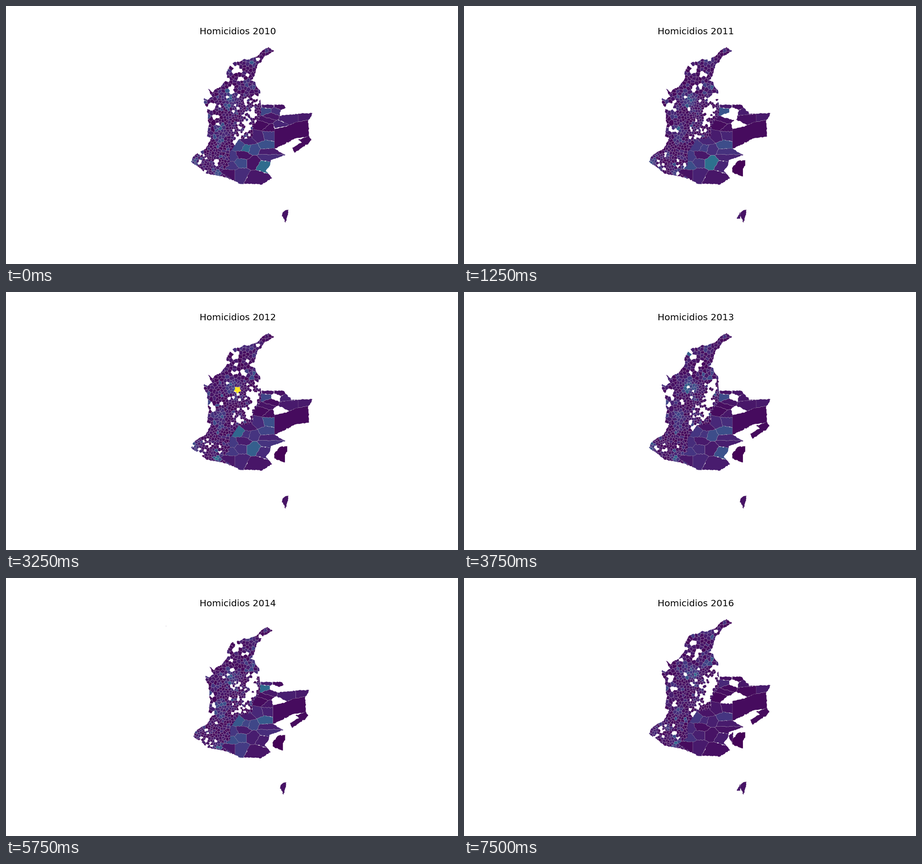
Animation, 990 px wide and 566 px high, one loop 8 s. Source, as a matplotlib script:

```python
import matplotlib.pyplot as plt
import numpy as np
from matplotlib.animation import ArtistAnimation
from matplotlib.collections import PolyCollection
from matplotlib.path import Path
from matplotlib.transforms import Affine2D

W, H, DPI = 990, 566, 64
PX = 72 / DPI
YEARS = range(10, 17)
VIRIDIS = plt.get_cmap("viridis")

WEST = [575, 90, 587, 99, 575, 107, 567, 109, 560, 122, 553, 126, 543, 155,
        537, 164, 545, 166, 551, 180, 556, 184, 558, 214, 562, 240, 562, 290,
        515, 330, 505, 386, 475, 374, 440, 368, 428, 358, 405, 341, 414, 326,
        430, 317, 437, 314, 450, 290, 440, 286, 444, 262, 440, 222, 433, 211,
        434, 202, 442, 206, 452, 199, 441, 179, 453, 190, 458, 183, 470, 178,
        484, 158, 483, 146, 492, 128, 500, 123, 510, 123, 520, 117, 528, 118,
        550, 111, 563, 97]

EAST = [560, 217, 608, 217, 626, 237, 640, 236, 640, 254, 612, 264, 588, 268,
        588, 313, 612, 327, 580, 338, 578, 350, 569, 362, 583, 377, 562, 391,
        512, 390, 470, 364, 490, 350, 490, 322, 510, 292, 540, 290, 543, 262,
        558, 240]

# Large eastern areas: centre and usual level in percent.
SEEDS = [574, 219, 8, 600, 221, 5, 571, 230, 30, 591, 230, 12, 612, 232, 9,
         580, 241, 6, 615, 246, 7, 573, 251, 5, 565, 261, 4, 577, 267, 5,
         598, 263, 17, 552, 287, 12, 577, 284, 13, 531, 297, 9, 570, 306, 26,
         541, 313, 19, 527, 311, 21, 572, 320, 13, 512, 307, 22, 518, 328, 6,
         542, 343, 8, 572, 332, 12, 566, 349, 10, 513, 343, 19, 496, 332, 18,
         493, 350, 24, 512, 368, 14, 490, 368, 6, 547, 376, 8]

gaps, peaks, lands = [], [], []


def gap(x, y, rx, ry, *years):
    gaps.append((x, y, rx, ry, years))


def peak(x, y, r, top, *years):
    peaks.append((x, y, r, top, years))


def land(level, years, *xy):
    lands.append((level, years, rough(pairs(xy), .6)))


def pairs(xy):
    return np.reshape(xy, (-1, 2)).astype(float)


def rough(poly, amp):
    """Make edges ragged, alike for both neighbours of an edge."""
    out = []
    for a, b in zip(poly, np.roll(poly, -1, axis=0)):
        out.append(a)
        d = b - a
        n = int(np.hypot(*d) // 2.5)
        if n < 2 or d[0] == 0:
            continue
        ends = sorted([tuple(a.round().astype(int)), tuple(b.round().astype(int))])
        rng = np.random.default_rng([abs(int(v)) for v in ends[0] + ends[1]])
        off = rng.normal(0, amp, n - 1)
        normal = np.array([-d[1], d[0]]) / np.hypot(*d)
        if tuple(d) < (0, 0):
            off, normal = off[::-1], -normal
        t = np.arange(1, n) / n
        out.extend(a + t[:, None] * d + off[:, None] * normal)
    return np.array(out)


def spacing(x, y):
    if x > 495 and y > 295:
        return 8
    if 495 < x and 195 < y < 292 or x < 455 and y > 325:
        return 3.8
    if x < 462 and 185 < y < 300:
        return 6.5
    return 5.8 if y < 195 else 4.6


def scatter_sites(rng, outline):
    darts = rng.uniform((403, 90), (590, 393), (11000, 2))
    sites = np.empty((0, 2))
    for p in darts[outline.contains_points(darts)]:
        if not len(sites) or np.hypot(*(sites - p).T).min() > spacing(*p):
            sites = np.vstack([sites, p])
    return sites


def cut(poly, a, b):
    """Keep the part of poly that is nearer to a than to b."""
    n = b - a
    side = poly @ n - n @ (a + b) / 2
    out = []
    for i in range(len(poly)):
        j = (i + 1) % len(poly)
        if side[i] <= 0:
            out.append(poly[i])
        if side[i] * side[j] < 0:
            t = side[i] / (side[i] - side[j])
            out.append(poly[i] + t * (poly[j] - poly[i]))
    return np.array(out)


def voronoi(sites, reach, amp, flat=1):
    """Ragged cells around the sites; flat > 1 makes them wide and low."""
    scale = np.array([1, flat])
    pts = sites * scale
    box = reach * np.array([(-1, -1), (1, -1), (1, 1), (-1, 1)])
    cells = []
    for p in pts:
        cell = p + box
        for q in pts[np.argsort(np.hypot(*(pts - p).T))[1:24]]:
            cell = cut(cell, p, q)
        cells.append(rough(cell / scale, amp))
    return cells


def bell(pts, x, y, r):
    return np.exp(-((pts[:, 0] - x) ** 2 + (pts[:, 1] - y) ** 2) / r ** 2)


def gap_chance(pts):
    """Share of small areas without data, apart from the clusters."""
    x, y = pts.T
    belt = (x - 550 + .42 * (y - 195)) / 15
    p = np.where((y > 190) & (y < 292), .5 * np.exp(-belt ** 2), 0)
    p = np.maximum(p, .28 * bell(pts, 500, 142, 18))
    p = np.maximum(p, .25 * bell(pts, 433, 345, 18))
    return np.maximum(p, .1 * bell(pts, 505, 230, 40)) + .02


def has_data(pts, year, rng, edge):
    known = np.ones(len(pts), bool)
    for x, y, rx, ry, years in gaps:
        if year in years:
            dist = np.hypot((pts[:, 0] - x) / rx, (pts[:, 1] - y) / ry)
            known &= dist > rng.uniform(edge, 1.05, len(pts))
    return known


def raised(pts, year, rng):
    total = np.zeros(len(pts))
    for x, y, r, top, years in peaks:
        if year in years:
            total += top * bell(pts, x, y, r) * rng.uniform(.35, 1.1, len(pts))
    return total


# Clusters without data
gap(500, 142, 9, 8, *YEARS)
gap(515, 161, 9, 4, 10, 13, 15, 16)
gap(517, 177, 9, 5, 11, 12)
gap(497, 172, 3, 8, 10, 12, 15)
gap(452, 222, 9, 9, 10, 11, 13, 15, 16)
gap(450, 251, 6, 9, 12, 13, 14)
gap(460, 243, 9, 6, 10, 15, 16)
gap(454, 281, 10, 4, 10, 11, 15)
gap(546, 202, 6, 10, 10, 11, 13, 14)
gap(536, 227, 11, 10, *range(11, 16))
gap(548, 230, 7, 11, 12, 14, 15, 16)
gap(537, 247, 11, 9, 13, 14, 15, 16)
gap(530, 268, 10, 8, 10, 12, 13, 16)
gap(502, 297, 7, 7, 10, 13, 15, 16)
gap(461, 343, 7, 6, 10, 16)
gap(483, 350, 5, 7, 11, 15)
gap(459, 274, 8, 6, 11, 16)
gap(591, 230, 3, 3, 11, 12, 13, 14, 16)
gap(612, 232, 3, 3, 10, 14)
gap(598, 263, 3, 3, *range(11, 17))
gap(580, 241, 3, 3, 11, 15)
gap(577, 267, 3, 3, 16)

# Raised levels
peak(492, 204, 16, .2, *YEARS)
peak(488, 210, 6, .3, 13, 15)
peak(507, 211, 6, .28, 13, 15, 16)
peak(488, 190, 6, .3, 10)
peak(469, 268, 9, .26, *range(10, 16))
peak(469, 294, 9, .2, *YEARS)
peak(464, 365, 9, .25, *YEARS)
peak(413, 341, 9, .2, *range(10, 14))
peak(445, 327, 6, .25, 11, 16)
peak(439, 337, 5, .45, 15)
peak(541, 176, 8, .17, *YEARS)
peak(535, 121, 9, .14, *YEARS)
peak(461, 239, 7, .18, 11, 13, 16)
peak(542, 343, 5, .25, 11, 12)
peak(566, 349, 5, .28, 10, 13)
peak(512, 307, 5, .2, 12)
peak(527, 311, 5, .2, 10)
peak(577, 284, 5, .18, 12)

# Areas with their own shape
land(7, YEARS, 640, 236, 671, 235, 668, 243, 662, 251, 640, 254)
land(3, YEARS, 588, 270, 607, 266, 640, 254, 662, 251, 664, 286, 632, 291,
     611, 303, 588, 313)
land(3, (10, 13, 14, 15, 16), 664, 285, 669, 294, 663, 301, 632, 322, 627, 311,
     648, 299, 640, 293)
land(4, (16,), 579, 346, 589, 338, 590, 353, 587, 363)
land(1, range(11, 17), 587, 356, 600, 340, 616, 338, 616, 350, 611, 357,
     611, 374, 588, 365)
land(5, YEARS, 604, 461, 606, 453, 612, 448, 619, 447, 613, 475)
land(7, (11, 16), 597, 466, 605, 452, 605, 467)
land(11, (15,), 608, 381, 621, 392, 625, 405, 607, 402)
spike = np.linspace(0, 2 * np.pi, 10, endpoint=False)
arm = np.where(np.arange(10) % 2, 5.5, 8.5)
land(100, (12,), *np.c_[507 + arm * np.sin(spike), 214.5 + arm * np.cos(spike)].flat)
for islet_years, ix, iy in ((YEARS, 343, 88), ((14,), 350.5, 70)):
    land(5, islet_years, ix - .4, iy - .5, ix + .4, iy - .5, ix + .4, iy + .5)

fig = plt.figure(figsize=(W / DPI, H / DPI), dpi=DPI, facecolor="white")
ax = fig.add_axes([0, 0, 1, 1])
ax.set(xlim=(0, W), ylim=(H, 0))
ax.axis("off")

rng = np.random.default_rng(11)
west, east = (Path(rough(pairs(xy), .6)) for xy in (WEST, EAST))
towns = scatter_sites(rng, west)
town_cells = voronoi(towns, 16, .45)
town_luck = rng.random(len(towns))
town_level = .015 + .045 * rng.exponential(size=len(towns))
seeds = np.reshape(SEEDS, (-1, 3)).astype(float)
plains, plain_level = seeds[:, :2], seeds[:, 2] / 100
plain_cells = voronoi(plains, 70, .6, 1.5)


def west_level(year):
    n = len(towns)
    luck = np.where(rng.random(n) < .5, town_luck, rng.random(n))
    known = has_data(towns, year, rng, .65) & (luck > gap_chance(towns))
    level = np.where(rng.random(n) < .6, town_level,
                     .015 + .04 * rng.exponential(size=n))
    return known, (level + raised(towns, year, rng)).clip(0, .55)


def east_level(year):
    known = has_data(plains, year, rng, 1)
    calm = .6 if year == 16 else 1
    level = plain_level * rng.uniform(.6, 1.25, len(plains)) * calm
    return known, level + raised(plains, year, rng)


def draw_year(year):
    fit = Affine2D()
    if year == 14:
        # The extra islet widens the extent, so the map shrinks.
        fit = Affine2D().scale(.9545, .9555).translate(23.4, 475 * (1 - .9555))
    place = fit + ax.transData
    artists = []

    def layer(polys, levels, clip=None):
        item = PolyCollection(polys, facecolors=VIRIDIS(np.array(levels)),
                              edgecolors="0.8", linewidths=.23 * PX, transform=place)
        ax.add_collection(item, autolim=False)
        if clip:
            item.set_clip_path(clip, place)
        artists.append(item)

    for cells, (known, level), clip in ((town_cells, west_level(year), west),
                                        (plain_cells, east_level(year), east)):
        layer([cells[i] for i in np.flatnonzero(known)], level[known], clip)
    shown = [(v / 100, p) for v, years, p in lands if year in years]
    layer([p for _, p in shown], [v for v, _ in shown])
    artists.append(ax.text(507.4, 61.9, f"Homicidios 20{year}", size=20 * PX,
                           ha="center", va="baseline", family="DejaVu Sans"))
    return artists


maps = [draw_year(year) for year in YEARS]

# 32 steps of 250 ms, five per year; the last year is cut short.
anim = ArtistAnimation(fig, [maps[i // 5] for i in range(32)],
                       interval=250, repeat=True, repeat_delay=0)
plt.show()
```
